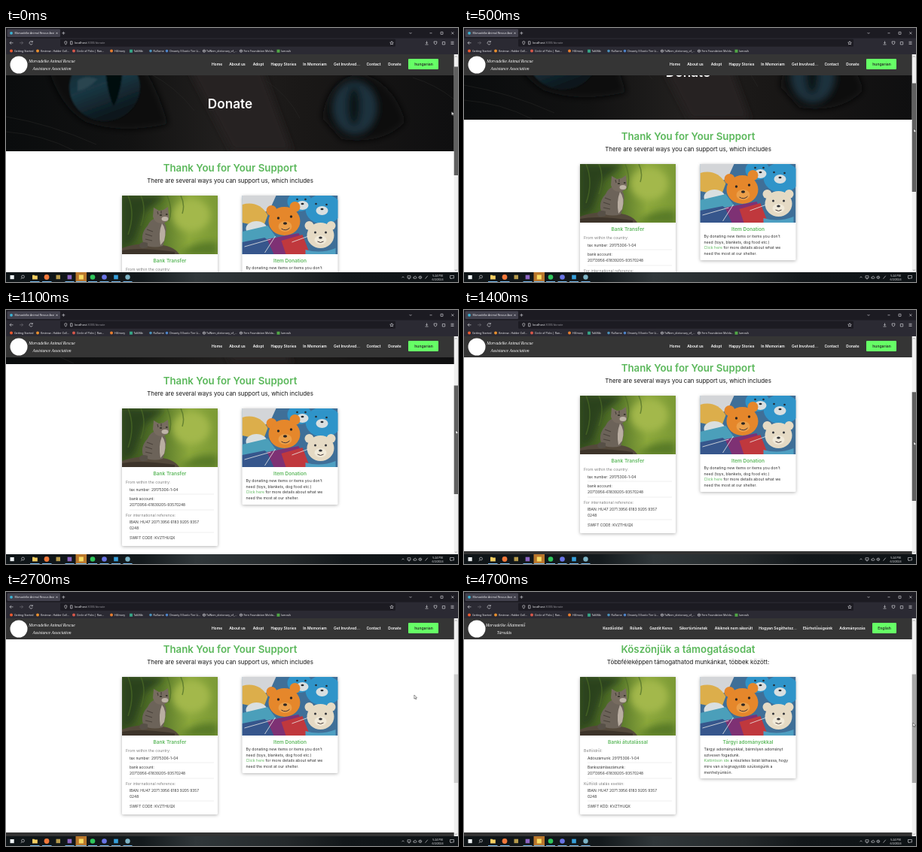
An HTML page that plays this animation: 600x338 px, repeating every 4800 ms.

```html
<!DOCTYPE html>
<html lang="en">
<head>
<meta charset="utf-8">
<title>Donate</title>
<style>
html, body { margin: 0; width: 100%; height: 100%; overflow: hidden; background: #fff; }
svg { display: block; width: 600px; height: 338px; font-family: Inter, "Open Sans", sans-serif; }
.ui { font: 3.6px "Open Sans", "Noto Sans", sans-serif; fill: #fbfbfe; }
.line { fill: none; stroke: #e4e4ea; stroke-width: .6; }
.mid { text-anchor: middle; }
.brand { font: italic 5.6px "Liberation Serif", "Noto Serif", serif; fill: #fff; }
.nav { font-size: 5px; font-weight: 600; fill: #fff; text-anchor: middle; }
.nav .dark { fill: #2a2f2a; }
.hero { font-size: 17.2px; font-weight: 600; fill: #fff; }
.h1 { font-size: 13.3px; font-weight: 600; fill: #5cb85c; }
.sub { font-size: 7.9px; fill: #161616; }
.h2 { font-size: 6.5px; font-weight: 600; fill: #5cb85c; }
.body { font-size: 5.2px; fill: #333; }
.item { font-size: 4.9px; fill: #333; }
.grey { fill: #808080; }
.link { fill: #5cb85c; }
.card { fill: #fff; filter: drop-shadow(0 1px 2px rgba(0, 0, 0, .3)); }
.rule { stroke: #dcdcdc; stroke-width: .5; }

#page, #thumb, #pointer, .en, .hu, .btn { animation: 4.8s step-end infinite; }
#page { animation-name: scroll; }
#thumb { animation-name: drag, press; }
#pointer { animation-name: point; }
.en { animation-name: leave; }
.hu { animation-name: enter; }
.btn { animation-name: hover; }

@keyframes scroll {
  0% { transform: translateY(0); animation-timing-function: steps(5); }
  10.41% { transform: translateY(-42px); animation-timing-function: steps(6); }
  22.91% { transform: translateY(-92px); }
  25% { transform: translateY(-100px); }
  27.08% { transform: translateY(-106px); }
  29.16% { transform: translateY(-109px); }
  31.25%, 100% { transform: translateY(-110px); }
}
@keyframes drag {
  0% { transform: translateY(0); animation-timing-function: steps(5); }
  10.41% { transform: translateY(22px); animation-timing-function: steps(6); }
  22.91% { transform: translateY(49px); }
  25% { transform: translateY(53px); }
  27.08% { transform: translateY(56px); }
  29.16% { transform: translateY(57.5px); }
  31.25%, 100% { transform: translateY(58px); }
}
@keyframes press {
  0% { fill: #606060; }
  47.91% { fill: #cdcdcd; }
  89.58%, 100% { fill: #a6a6a6; }
}
@keyframes point {
  0% { transform: translate(591.5px, 111px); animation-timing-function: steps(5); }
  10.41% { transform: translate(597px, 134px); animation-timing-function: steps(6); }
  22.91% { transform: translate(597px, 160px); animation-timing-function: steps(5); }
  33.33% { transform: translate(597px, 185px); animation-timing-function: steps(2); }
  37.5% { transform: translate(593px, 327px); animation-timing-function: steps(3); }
  43.75% { transform: translate(572px, 328px); }
  50% { transform: translate(572px, 328px); animation-timing-function: steps(3); }
  56.25% { transform: translate(541.8px, 137px); animation-timing-function: steps(3); }
  62.5% { transform: translate(556px, 48px); }
  66.66% { transform: translate(556px, 48px); animation-timing-function: steps(3); }
  72.91% { transform: translate(555.8px, 74.3px); animation-timing-function: steps(8); }
  89.58%, 100% { transform: translate(596px, 174px); }
}
@keyframes leave { 0% { visibility: visible; } 66.66%, 100% { visibility: hidden; } }
@keyframes enter { 0% { visibility: hidden; } 66.66%, 100% { visibility: visible; } }
@keyframes hover {
  0% { fill: #66ff66; }
  60.41% { fill: #61dc61; }
  62.5% { fill: #5cb85c; }
  77.08% { fill: #61dc61; }
  79.16%, 100% { fill: #66ff66; }
}
</style>
</head>
<body>
<svg viewBox="0 0 600 338" xmlns="http://www.w3.org/2000/svg">
<defs>
  <clipPath id="view"><rect y="35" width="595" height="290"/></clipPath>
  <clipPath id="heroBox"><rect y="30" width="595" height="134"/></clipPath>
  <clipPath id="photo"><rect width="127" height="78"/></clipPath>
  <filter id="soft" x="-30%" y="-30%" width="160%" height="160%"><feGaussianBlur stdDeviation="5"/></filter>
  <filter id="haze" x="-30%" y="-30%" width="160%" height="160%"><feGaussianBlur stdDeviation="1.2"/></filter>
  <linearGradient id="fur">
    <stop offset="0" stop-color="#0a0c0d"/><stop offset=".28" stop-color="#121212"/>
    <stop offset=".48" stop-color="#211f1e"/><stop offset=".66" stop-color="#1a1817"/>
    <stop offset="1" stop-color="#0f0f10"/>
  </linearGradient>
  <linearGradient id="iris" x1="0" x2=".4" y1="0" y2="1">
    <stop offset="0" stop-color="#10222a"/><stop offset=".55" stop-color="#1a3743"/>
    <stop offset="1" stop-color="#0c161b"/>
  </linearGradient>
  <linearGradient id="leaf">
    <stop offset="0" stop-color="#3a5420"/><stop offset=".4" stop-color="#56762a"/>
    <stop offset=".7" stop-color="#8ca83c"/><stop offset="1" stop-color="#7c9a36"/>
  </linearGradient>
  <linearGradient id="task">
    <stop offset="0" stop-color="#0e1417"/><stop offset=".3" stop-color="#13191c"/>
    <stop offset=".42" stop-color="#30373a"/><stop offset=".62" stop-color="#24292b"/>
    <stop offset=".75" stop-color="#12171a"/><stop offset="1" stop-color="#0d1215"/>
  </linearGradient>
</defs>

<rect width="600" height="338" fill="#fff"/>

<g clip-path="url(#view)">
<g id="page">
  <g clip-path="url(#heroBox)">
    <rect y="30" width="595" height="134" fill="url(#fur)"/>
    <g filter="url(#soft)">
      <path d="M55 50Q110 20 185 55Q205 90 215 128Q150 142 105 125Q70 104 55 50Z" fill="#07090a"/>
      <path d="M230 30L330 30L380 164L300 164Z" fill="#262321"/>
      <path d="M420 120Q425 70 470 60Q515 72 530 125Q500 156 445 148Z" fill="#0b0d0e"/>
    </g>
    <g filter="url(#haze)">
      <ellipse cx="131" cy="79" rx="47" ry="45" fill="url(#iris)"/>
      <path d="M131 30H156Q156 80 143 104Q131 80 131 30Z" fill="#05080a"/>
      <path d="M95 70Q105 62 122 68Q108 82 95 84Z" fill="#29444f"/>
    </g>
    <g filter="url(#soft)">
      <ellipse cx="463" cy="106" rx="30" ry="36" fill="#1d323c"/>
      <ellipse cx="462" cy="104" rx="9" ry="26" fill="#0c1316"/>
    </g>
    <path d="M0 118Q60 128 120 155M0 138Q50 142 90 163M190 60Q225 78 250 110M345 70Q375 90 390 120M540 66Q570 75 595 95" fill="none" stroke="#2b2a29" stroke-width=".5"/>
  </g>
  <rect y="430" width="595" height="60" fill="#333"/>

  <rect class="card" x="154" y="223" width="127" height="183" rx="1.500"/>
  <rect class="card en" x="313.500" y="223" width="127" height="128" rx="1.500"/>
  <rect class="card hu" x="313.500" y="223" width="127" height="135" rx="1.500"/>

  <g transform="translate(154 223)" clip-path="url(#photo)">
    <rect width="127" height="78" fill="url(#leaf)"/>
    <g filter="url(#soft)">
      <path d="M0 0H58L30 22L16 60L0 70Z" fill="#2b421c"/>
      <ellipse cx="92" cy="26" rx="25" ry="22" fill="#a3b84c"/>
      <path d="M75 80Q95 58 127 62V80Z" fill="#597a28"/>
    </g>
    <path d="M8 0Q18 24 8 52M25 0Q33 18 25 40M60 0Q68 20 62 34M78 0Q84 12 80 24" fill="none" stroke="#4d6d27" stroke-width="1.500" opacity=".7"/>
    <path d="M0 70Q20 62 45 65Q68 66 76 78H0Z" fill="#54493b"/>
    <path d="M0 73Q22 68 70 75V78H0Z" fill="#3d342a"/>
    <path d="M29 65Q23 52 34 40Q39 28 50 31Q61 37 58 50Q57 60 54 67Q40 71 29 65Z" fill="#6c6359"/>
    <path d="M53 37Q60 45 56 60L51 66Q48 50 53 37Z" fill="#b9aea2"/>
    <path d="M34 63Q24 60 23 67Q24 72 34 69Z" fill="#575047"/>
    <path d="M41 28L42 16L49 20L55 19L61 15L62 26Q64 35 53 37Q43 37 41 28Z" fill="#776c60"/>
    <ellipse cx="57" cy="31" rx="4.500" ry="3" fill="#beb4a7"/>
    <path d="M50 26h3M58 25h2.500" stroke="#2b2b20" stroke-width="1.600"/>
    <path d="M33 45l8 3M31 51l9 3M31 58l9 2M47 21l1 4M52 20v4" stroke="#4a433b" stroke-width="1.200"/>
  </g>

  <g transform="translate(313.500 223)" clip-path="url(#photo)">
    <rect width="127" height="78" fill="#3f6f98"/>
    <path d="M0 0H45L36 20L0 30Z" fill="#d3d5d8"/>
    <path d="M0 12Q22 6 34 26L28 42L0 36Z" fill="#dcae4b"/>
    <g fill="#2f94c9">
      <ellipse cx="76" cy="8" rx="16" ry="13"/>
      <ellipse cx="108" cy="18" rx="24" ry="20"/>
    </g>
    <g fill="#d9dfe0">
      <ellipse cx="80" cy="13" rx="8" ry="6"/>
      <ellipse cx="106" cy="20" rx="8" ry="6"/>
      <ellipse cx="19" cy="44" rx="14" ry="10"/>
    </g>
    <g fill="#24292f">
      <circle cx="73" cy="5" r="1.300"/><circle cx="84" cy="5" r="1.300"/>
      <circle cx="98" cy="11" r="1.300"/><circle cx="112" cy="12" r="1.300"/>
      <ellipse cx="80" cy="11" rx="2" ry="1.300"/><ellipse cx="106" cy="18" rx="2" ry="1.300"/>
    </g>
    <path d="M0 48L34 40L50 62L34 78H0Z" fill="#4b9fba"/>
    <path d="M0 62L30 56L58 78H0Z" fill="#36568c"/>
    <path d="M33 58L75 50L88 78H42Z" fill="#7e3174"/>
    <path d="M52 60L80 52L90 78H58Z" fill="#c0383d"/>
    <g fill="#e5872b">
      <circle cx="39" cy="20" r="7"/><circle cx="70" cy="15" r="7"/>
      <ellipse cx="56" cy="34" rx="21" ry="19"/>
    </g>
    <ellipse cx="57" cy="41" rx="9" ry="7" fill="#eca04a"/>
    <g fill="#2b2522">
      <circle cx="48" cy="30" r="1.700"/><circle cx="65" cy="28" r="1.700"/>
      <ellipse cx="57" cy="37" rx="2.600" ry="1.700"/>
    </g>
    <g fill="#e5dac4">
      <circle cx="89" cy="40" r="6"/><circle cx="118" cy="40" r="6"/>
      <ellipse cx="104" cy="53" rx="18" ry="17"/>
    </g>
    <path d="M84 72Q104 78 124 70V78H84Z" fill="#4e9fc2"/>
    <ellipse cx="104" cy="59" rx="8" ry="6" fill="#f1ead9"/>
    <g fill="#303136">
      <circle cx="97" cy="49" r="1.500"/><circle cx="111" cy="49" r="1.500"/>
      <ellipse cx="104" cy="56" rx="2.300" ry="1.500"/>
    </g>
    <path d="M52 44q6 4 11-1M100 61q4 3 8 0" fill="none" stroke="#413334"/>
    <path d="M3 68L38 58M30 76L44 54M66 62L88 54" stroke="#eaeae8" stroke-width=".8"/>
  </g>

  <path class="rule" d="M164 337H276M164 358H276M164 388H276"/>
  <g class="item">
    <text x="164" y="353">20713956-61839205-93570248</text>
    <text x="164" y="376.300">IBAN: HU47 2071 3956 6183 9205 9357</text>
    <text x="164" y="384">0248</text>
  </g>

  <g class="en">
    <text class="hero mid" x="297.500" y="106.800">Donate</text>
    <text class="h1 mid" x="297.500" y="191">Thank You for Your Support</text>
    <text class="sub mid" x="297.500" y="205.800">There are several ways you can support us, which includes</text>
    <text class="h2 mid" x="217.500" y="311.700">Bank Transfer</text>
    <text class="h2 mid" x="377" y="311.700">Item Donation</text>
    <g class="body">
      <text class="grey" x="159" y="322.800">From within the country:</text>
      <text class="grey" x="159" y="367">For international reference:</text>
      <text x="318.500" y="321">By donating new items or items you don't</text>
      <text x="318.500" y="328.800">need (toys, blankets, dog food etc.)</text>
      <text x="318.500" y="336.400"><tspan class="link">Click here</tspan> for more details about what we</text>
      <text x="318.500" y="344">need the most at our shelter.</text>
    </g>
    <g class="item">
      <text x="164" y="332.800">tax number: 29175306-1-04</text>
      <text x="164" y="345.200">bank account:</text>
      <text x="164" y="396.800">SWIFT CODE: KVZTHUQX</text>
    </g>
  </g>

  <g class="hu" lang="hu">
    <text class="h1 mid" x="297.500" y="191">Köszönjük a támogatásodat</text>
    <text class="sub mid" x="297.500" y="205.800">Többféleképpen támogathatod munkánkat, többek között:</text>
    <text class="h2 mid" x="217.500" y="311.700">Banki átutalással</text>
    <text class="h2 mid" x="377" y="311.700">Tárgyi adományokkal</text>
    <g class="body">
      <text class="grey" x="159" y="322.800">Belföldről:</text>
      <text class="grey" x="159" y="367">Külföldi utalás esetén:</text>
      <text x="318.500" y="321">Tárgyi adományokkal, bármilyen adományt</text>
      <text x="318.500" y="328.800">szívesen fogadunk.</text>
      <text x="318.500" y="336.400"><tspan class="link">Kattintson ide</tspan> a részletes listát láthassa, hogy</text>
      <text x="318.500" y="344">mire van a legnagyobb szükségünk a</text>
      <text x="318.500" y="351.600">menhelyünkön.</text>
    </g>
    <g class="item">
      <text x="164" y="332.800">Adószámunk: 29175306-1-04</text>
      <text x="164" y="345.200">Bankszámlaszámunk:</text>
      <text x="164" y="396.800">SWIFT KÓD: KVZTHUQX</text>
    </g>
  </g>
</g>

<rect y="35" width="595" height="28" fill="#353535"/>
<circle cx="17" cy="49" r="11.500" fill="#fff"/>
<g class="en nav">
  <g class="brand">
    <text x="61" y="46">Morvadelke Animal Rescue</text>
    <text x="61" y="56">Assistance Association</text>
  </g>
  <text x="280" y="50">Home</text>
  <text x="307" y="50">About us</text>
  <text x="335" y="50">Adopt</text>
  <text x="368.500" y="50">Happy Stories</text>
  <text x="410" y="50">In Memoriam</text>
  <text x="452.500" y="50">Get Involved...</text>
  <text x="488" y="50">Contact</text>
  <text x="516" y="50">Donate</text>
</g>
<g class="hu nav" lang="hu">
  <g class="brand">
    <text x="55" y="46">Morvadelke Állatmentő</text>
    <text x="53.500" y="56">Társulás</text>
  </g>
  <text x="197.500" y="50">Kezdőoldal</text>
  <text x="228.500" y="50">Rólunk</text>
  <text x="261.500" y="50">Gazdit Keres</text>
  <text x="304.500" y="50">Sikertörténetek</text>
  <text x="358" y="50">Akiknek nem sikerült</text>
  <text x="416.500" y="50">Hogyan Segíthetsz...</text>
  <text x="469.500" y="50">Elérhetőségeink</text>
  <text x="515.500" y="50">Adományozás</text>
</g>
<g class="en nav">
  <rect class="btn" x="534" y="41" width="40" height="14" rx="1"/>
  <text class="dark" x="554.500" y="50">hungarian</text>
</g>
<g class="hu nav">
  <rect class="btn" x="542" y="41" width="32" height="14" rx="1"/>
  <text class="dark" x="558" y="50">English</text>
</g>
</g>

<!-- scrollbar -->
<rect x="594.700" y="35" width="5.300" height="290" fill="#f0f0f0"/>
<path d="M596.100 38.700L597.300 37.300L598.500 38.700M596.100 321.500L597.300 322.900L598.500 321.500" fill="none" stroke="#606060" stroke-width=".5"/>
<rect id="thumb" x="594.700" y="51.500" width="5.300" height="144.500"/>

<!-- browser -->
<rect width="600" height="35" fill="#2b2a33"/>
<rect width="600" height="13.500" fill="#1c1b22"/>
<rect x="1.500" y="1.500" width="70.500" height="10.500" rx="1.300" fill="#42414d"/>
<rect x="72" y="14.800" width="445" height="10" rx="1.300" fill="#1c1b22"/>
<circle cx="7" cy="6.800" r="1.900" fill="#3ab5d6"/>
<g class="line">
  <path d="M66.500 5.800l2 2m0-2l-2 2M74.300 6.800h4m-2-2v4"/>
  <path d="M535.500 6l1.500 1.500l1.500-1.500M562.500 6.800h3M577 5.300h3v3h-3ZM591.300 5.300l3 3m0-3l-3 3"/>
  <path d="M9.500 19.800h-4.500m2-2l-2 2l2 2"/>
  <path d="M18 19.800h4.500m-2-2l2 2l-2 2" opacity=".4"/>
  <path d="M35 18.500a2.200 2.200 0 1 0 .3 2.200M35.300 17v1.800h-1.800"/>
  <path d="M77.800 18.200l1.500-.6l1.500.6q0 3-1.500 4q-1.500-1-1.500-4ZM85.500 17.800h2.500v4h-2.500Z"/>
  <path d="M512 17.600l.7 1.500l1.600.2l-1.200 1.100l.3 1.600l-1.400-.8l-1.400.8l.3-1.600l-1.200-1.100l1.600-.2Z"/>
  <path d="M558.500 17.500v3m-1.300-1.200l1.300 1.300l1.300-1.300M556.500 22h4M568 18h4q0 4-2 4t-2-4ZM579.300 18.500h3.400v3.500h-3.400ZM590.500 18.300h4M590.500 19.900h4M590.500 21.500h4"/>
</g>
<g class="ui">
  <text x="11.500" y="8.200">Morvadelke Animal Rescue Assi</text>
  <text x="91" y="21.200" style="font-size:3.900px">localhost<tspan fill="#96959c">:3000/donate</tspan></text>
  <text x="11" y="31.900">Getting Started</text>
  <text x="46" y="31.900">Kestrow - Halder Coll...</text>
  <text x="94" y="31.900">Circle of Picks | Ran...</text>
  <text x="144" y="31.900">Hillmory</text>
  <text x="169.500" y="31.900">TalkNib</text>
  <text x="195.500" y="31.900">RuVarne</text>
  <text x="217" y="31.900">Orvanty 3 Exotic Tier Li...</text>
  <text x="266" y="31.900">TalNem_dictionary_of_...</text>
  <text x="315.500" y="31.900">Fern Foundation Molda...</text>
  <text x="365" y="31.900">lumovik</text>
</g>
<circle cx="7" cy="30.600" r="2" fill="#ee5a2f"/>
<circle cx="42" cy="30.600" r="2" fill="#e98f2d"/>
<circle cx="90" cy="30.600" r="2" fill="#d8574a"/>
<circle cx="140" cy="30.600" r="2" fill="#e77d2e"/>
<rect x="164" y="28.700" width="4" height="4" fill="#35a485"/>
<circle cx="192" cy="30.600" r="1.800" fill="#4b91bb"/>
<circle cx="213.500" cy="30.600" r="1.800" fill="#4d83c9"/>
<g class="line"><circle cx="263" cy="30.600" r="1.700"/><circle cx="312" cy="30.600" r="1.700"/><path d="M261.300 30.600h3.400M310.300 30.600h3.400"/></g>
<rect x="359.500" y="28.700" width="4" height="4" fill="#51a846"/>

<!-- taskbar -->
<rect y="325" width="600" height="13" fill="url(#task)"/>
<rect x="92.500" y="325" width="14.500" height="13" fill="#b9762c"/>
<path d="M32 337.500h12.500M48 337.500h12.500M78.500 337.500h12M93 337.500h13.500M109 337.500h12M124.500 337.500h12M140 337.500h12M155.500 337.500h12" stroke="#76b9ed"/>
<rect x="5.500" y="329" width="5.200" height="5.200" fill="#eef3f6"/>
<g class="line"><circle cx="22.500" cy="331" r="1.900"/><path d="M21.200 332.500l-1.500 1.700"/></g>
<path d="M35 328.700h2.500l.8.800h3.500v5h-6.800Z" fill="#f4ce62"/>
<circle cx="54" cy="331.500" r="3.400" fill="#f0783a"/>
<rect x="66.500" y="328.700" width="5.500" height="5.500" fill="#b69a4b"/>
<rect x="81.600" y="328.700" width="5.600" height="5.600" fill="#8b64c2"/>
<rect x="96.800" y="328.500" width="6" height="6" fill="#f7dc63"/>
<circle cx="115" cy="331.500" r="3.300" fill="#2fc65b"/>
<circle cx="130.500" cy="331.500" r="3.300" fill="#6974e5"/>
<rect x="143.200" y="328.700" width="5.600" height="5.600" fill="#369fdb"/>
<circle cx="161.500" cy="331.500" r="3.200" fill="#7db4c6"/>
<g class="line">
  <path d="M525.500 332.300l1.500-1.500l1.500 1.500M533 329.800h4v3h-4ZM534 333.800h2M541 333.200q-1-2 1-2q1-2 2.500 0q1.500 1 0 2Z"/>
  <path d="M548 330.800h1l1.200-1v4l-1.200-1h-1ZM551.300 330.400q1 1.400 0 2.800M556.500 333.700l3.300-4M589.500 329.500h5v3.500h-3l-1 1v-1h-1Z"/>
</g>
<g class="ui mid">
  <text x="573" y="330.600">5:24 PM</text>
  <text x="573" y="336.300">6/2/2024</text>
</g>

<path id="pointer" d="M0 0V5.200L1.200 4.100L2 5.900L2.900 5.500L2.100 3.800H3.700Z" fill="#fff" stroke="#222" stroke-width=".5"/>
</svg>
</body>
</html>
```
